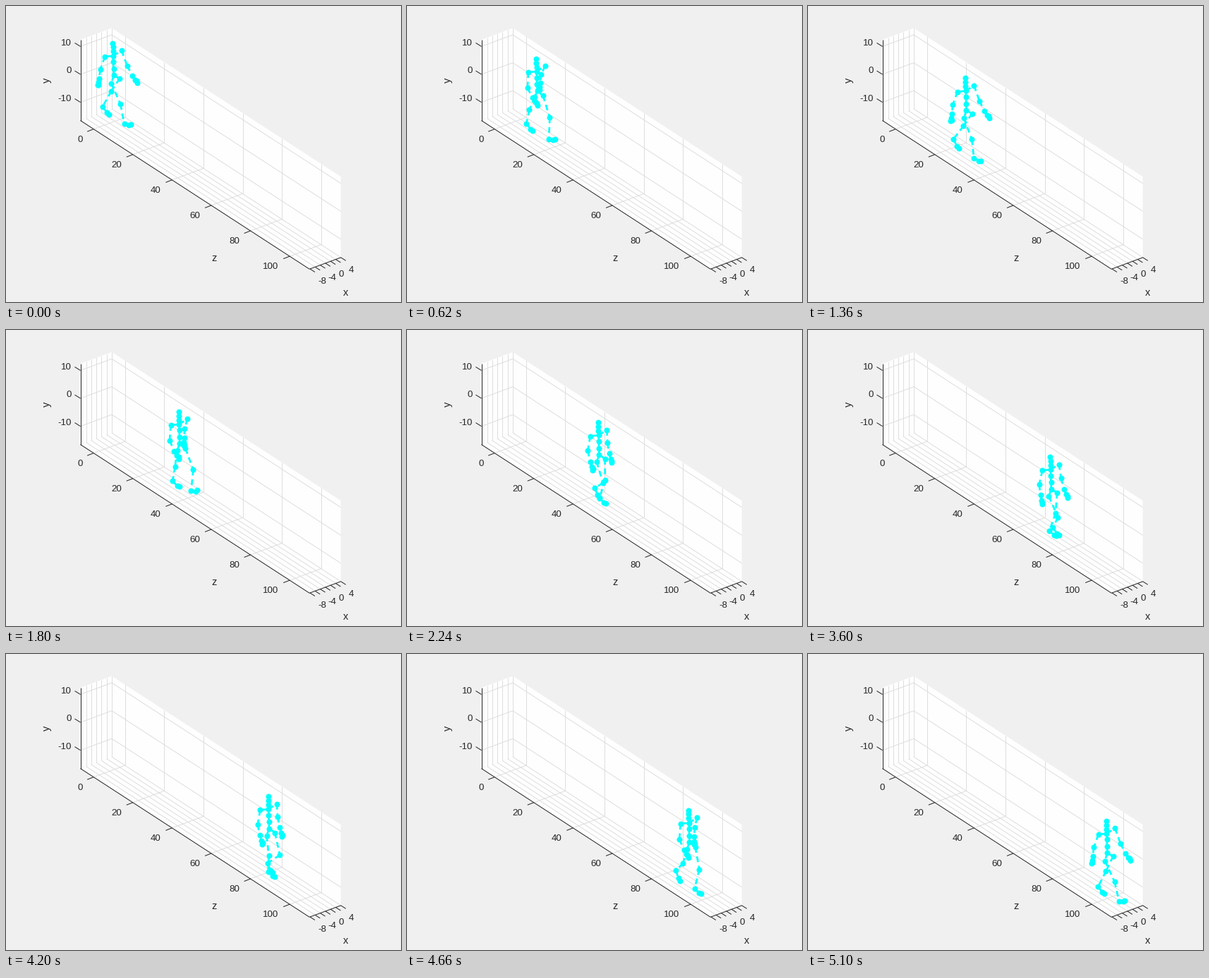
Recreate the animation shown at these times as a matplotlib script. Size 560 by 420 pixels, loop 5.12 s.

```python
import numpy as np
import matplotlib.pyplot as plt
from matplotlib.animation import FuncAnimation
from matplotlib.collections import LineCollection

W, H, DPI = 560, 420, 100
STEP, FRAMES = 20, 256
STRIDE = 1290                      # ms per full gait cycle
PX = 72 / DPI                      # points per pixel
INK, GRID, CYAN = "#262626", "#dedede", "#00ffff"

# screen direction of one unit along x (sideways), y (up) and z (forward)
AXES = np.array([[3.65, -1.36], [0, -3.96], [2.78, 1.805]])

ms = np.arange(FRAMES) * STEP
gait = 2 * np.pi * ms / STRIDE


def vec(x, y, z):
    """Screen offset of a 3D vector in every frame."""
    return np.stack(np.broadcast_arrays(x, y, z, gait)[:3], axis=-1) @ AXES


def wave(phase, mean, *harmonics):
    """Sum of (cos, sin) harmonics."""
    return mean + sum(a * np.cos(n * phase) + b * np.sin(n * phase)
                      for n, (a, b) in enumerate(harmonics, 1))


# --- skeleton: joint tracks and the bones between them ----------------------
joints, bones = [], []


def add(track, parent=None):
    joints.append(track)
    if parent is not None:
        bones.append((parent, len(joints) - 1))
    return len(joints) - 1


def swing(parent, length, angle, splay=0):
    """Hang a bone from a joint; the angle opens forward from straight down."""
    a = np.radians(angle)
    bone = vec(splay, -length * np.cos(a), length * np.sin(a))
    return add(joints[parent] + bone, parent)


def add_leg(side, phase):
    hip = add(joints[ROOT] + vec(1.6 * side, -1.65 - .28 * np.cos(phase), .85), ROOT)
    thigh = wave(phase, 8, (32.5, -7.5), (-6.5, -7), (0, 3))
    shin = wave(phase, -20, (17, 12), (10, -8), (-2, -5))
    foot = wave(phase, 71, (25.5, 13), (10.5, -19.5), (-3.5, -6))
    knee = swing(hip, 7.1, thigh, -.5 * side)
    ankle = swing(knee, 7.1, shin, -side)
    ball = swing(ankle, 2.4, foot)
    swing(ball, 1.1, foot + 25)


def add_arm(side, phase):
    shoulder = add(joints[CHEST] + vec(3.23 * side, .8, 0), CHEST)
    back = -np.cos(phase)
    elbow = swing(shoulder, 5.2, -5 + (19 + 8 * side) * back, .7 * side)
    wrist = swing(elbow, 3.5, 19 + 29 * back)
    hand = 24 + 38 * back
    palm = swing(wrist, 1.7, hand)
    swing(palm, 1.2, hand)
    swing(palm, .8, hand + 30)


sway = np.column_stack([wave(gait, -.9, (.5, -1.8), (.35, 0)),
                        wave(gait, -.9, (0, 0), (1.4, 1.2))])
head = np.array([151.5, 52]) + np.outer(ms / 5100, [271, 185]) + sway

CHEST, ROOT = 3, 6
for n, depth in enumerate([0, 1.47, 2.95, 4.5, 6.65, 9, 11.3]):
    add(head + vec(0, -depth, .045 * depth), n - 1 if n else None)
for side, phase in ((-1, gait), (1, gait + np.pi)):
    add_leg(side, phase)
    add_arm(side, phase)

joints = np.stack(joints, axis=1)
bones = np.array(bones)

# --- stage ------------------------------------------------------------------
fig = plt.figure(figsize=(W / DPI, H / DPI), dpi=DPI, facecolor="#f0f0f0")
ax = fig.add_axes([0, 0, 1, 1])
ax.set_xlim(0, W)
ax.set_ylim(H, 0)
ax.axis("off")

FRONT, BACK = np.array([105.5, 162.5]), np.array([150, 146])   # floor corners
ALONG = np.array([324.7, 210.8])                               # full z extent
UP = np.array([0, -114.7])


def at_z(z):
    return ALONG * (18.7 + 2.78 * z) / ALONG[0]


def at_x(x):
    return BACK + (FRONT - BACK) * (4 - x) / 12.2


def at_y(y):
    return np.array([0, -65.5 - 3.96 * y])


def lines(segs, color, z):
    ax.add_collection(LineCollection(segs, colors=color, linewidths=PX, zorder=z))


def label(pos, text, ha="center", size=13.33, **kw):
    ax.text(*pos, text, ha=ha, va="center", fontsize=size * PX,
            family="Liberation Sans", color=INK, **kw)


for quad in ([FRONT, BACK, BACK + UP, FRONT + UP],
             [BACK, BACK + ALONG, BACK + ALONG + UP, BACK + UP],
             [FRONT, BACK, BACK + ALONG, FRONT + ALONG]):
    ax.fill(*np.array(quad).T, color="#fefefe", lw=0, zorder=0)

grid, ticks = [], []
for z in range(0, 101, 20):
    d = at_z(z)
    grid += [(FRONT + d, BACK + d), (BACK + d, BACK + d + UP)]
    ticks.append((FRONT + d, FRONT + d + [-9, 3.5]))
    label(FRONT + d + [-15.5, 15.3], str(z), "right")
for y in (-10, 0, 10):
    d = at_y(y)
    grid += [(FRONT + d, BACK + d), (BACK + d, BACK + ALONG + d)]
    ticks.append((FRONT + d, FRONT + d + [-8, -5]))
    label(FRONT + d + [-12.3, -4.8], str(y), "right")
for x in range(-8, 5, 2):
    p = at_x(x)
    if x > -8:
        grid += [(p, p + UP), (p, p + ALONG)]
    ticks.append((p + ALONG, p + ALONG + [7, 4.5]))
    if x % 4 == 0:
        label(p + ALONG + [11.3, 18.3], str(x), "left")

lines(grid, GRID, 1)
lines(ticks + [(FRONT, FRONT + UP), (FRONT, FRONT + ALONG),
               (FRONT + ALONG, BACK + ALONG)], INK, 2)
label((58, 105), "y", size=14.67, rotation=90)
label((295.5, 358), "z", size=14.67)
label((482, 407), "x", size=14.67)

limbs = LineCollection([], colors=CYAN, linewidths=2.7 * PX,
                       linestyles=[(0, (3, 2))], zorder=3)
ax.add_collection(limbs)
dots, = ax.plot([], [], "o", color=CYAN, ms=8 * PX, mew=0, zorder=4)


def draw(i):
    pose = joints[i]
    limbs.set_segments(pose[bones])
    dots.set_data(pose[:, 0], pose[:, 1])
    return limbs, dots


anim = FuncAnimation(fig, draw, frames=FRAMES, interval=STEP, repeat=True,
                     repeat_delay=0, blit=False)
plt.show()
```
